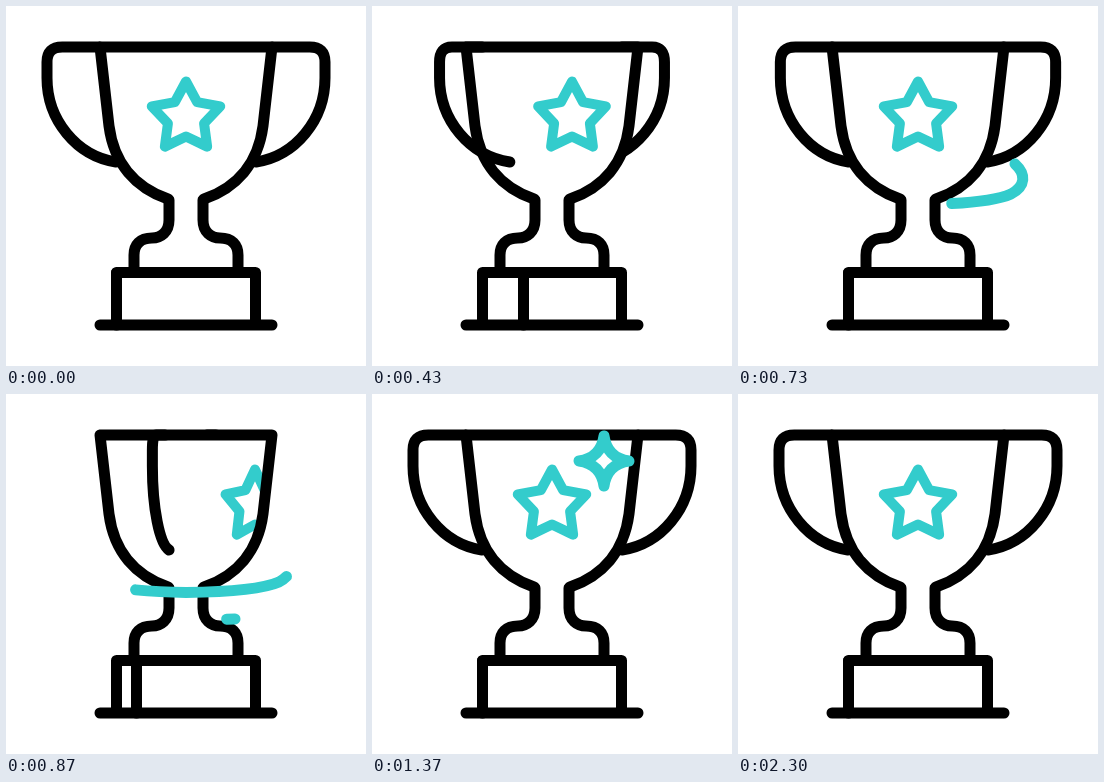
Write an HTML page that moves like this. It is 360 by 360 pixels and loops after 2.5 s.

```html
<!DOCTYPE html>
<html lang="en">
<head>
<meta charset="utf-8">
<title>Spinning trophy</title>
<style>
  html, body { margin: 0; height: 100%; overflow: hidden; background: #fff; }
  svg { display: block; width: 100vw; height: 100vh; }
  path { fill: none; stroke: #000; stroke-width: 11; stroke-linecap: round; stroke-linejoin: round; }
  .teal path, path.teal { stroke: #33cccc; }
</style>
</head>
<body>
<svg viewBox="0 0 360 360">
  <clipPath id="bowl"><path d="M94 41 L103 120 C108 158 130 182 162 193 H198 C230 182 252 158 257 120 L266 41 Z"/></clipPath>
  <path id="back"/>
  <rect width="360" height="360" fill="#fff" clip-path="url(#bowl)"/>
  <g clip-path="url(#bowl)"><path id="star" class="teal" style="stroke-width:10"/></g>
  <path d="M162 193 C130 182 108 158 103 120 L94 41 H266 L257 120 C252 158 230 182 198 193"/>
  <path d="M163 194 V214 C163 226 155 232 146 232 C134 232 128 239 128 249 V266"/>
  <path d="M197 194 V214 C197 226 205 232 214 232 C226 232 232 239 232 249 V266"/>
  <path d="M110.500 319 V266.500 H249.500 V319 M94 319 H266"/>
  <path id="edge" d="M110.500 267 V319"/>
  <path id="front"/>
  <g class="teal">
    <path id="upper" pathLength="1" d="M277 158 C288 168 288 180 273 188 C255 196 220 198 180 198.500 C140 198 100 194 85 187 C70 181 70 172 79 167"/>
    <path id="lower" pathLength="1" d="M229 225 C195 225.500 165 227 145 224 C125 220 120 212 128 206"/>
    <path id="spark" style="fill:#fff" d="M0 -25 Q3 -3 25 0 Q3 3 0 25 Q-3 3 -25 0 Q-3 -3 0 -25 Z"/>
  </g>
</svg>
<script>
const LOOP = 2500, FPS = 30, MID = 180, BASE = 139;
const STAR_LAP = 240;
const el = id => document.getElementById(id);
const set = (id, name, value) => el(id).setAttribute(name, value);

// Tracks are [frame, value] keys
const tracks = {
  turn: [[7, 0], [13, 36], [19, 138], [22, 172], [26, 256], [30, 360]],
  grip: [[7, 0], [13, 53], [19, 134], [22, 172], [26, 256], [30, 360]],
  star: [[7, 0], [13, 20], [19, 224], [22, 240], [26, 309], [30, 480]],
  edge: [[7, 0], [13, 41], [19, 130], [22, 139], [26, 159], [30, 278]],
  upperHead: [[17, 0], [19, .14], [26, .71], [30, 1]],
  upperTail: [[23, 0], [26, .11], [30, .55], [34, 1]],
  lowerHead: [[25, 0], [26, .07], [30, .44], [35, 1]],
  lowerTail: [[30, 0], [37, 1]],
  spark: [[34, 0], [41, 1], [62, 1], [69, 0]]
};

// Smooth interpolation that never overshoots its keys
function at(name, f) {
  const keys = tracks[name], last = keys.length - 1;
  if (f <= keys[0][0]) return keys[0][1];
  if (f >= keys[last][0]) return keys[last][1];
  const slope = i => (keys[i + 1][1] - keys[i][1]) / (keys[i + 1][0] - keys[i][0]);
  const tangent = i => {
    if (i === 0 || i === last) return 0;
    const a = slope(i - 1), b = slope(i);
    return a * b > 0 ? 2 * a * b / (a + b) : 0;
  };
  const i = keys.findIndex(k => k[0] > f) - 1;
  const [x, y] = keys[i], w = keys[i + 1][0] - x, u = (f - x) / w;
  const s = u * u * (3 - 2 * u);
  return y + (keys[i + 1][1] - y) * s
    + w * u * (1 - u) * ((1 - u) * tangent(i) - u * tangent(i + 1));
}

// outer and end are signed distances from the trophy's axis
function handle(outer, end) {
  const o = MID + outer, e = MID + end;
  return `M${MID + outer * .62} 41 H${MID + outer * .89} Q${o} 41 ${o} 56 V72
    C${o} 114 ${e + (o - e) * .57} 150 ${e} 156`;
}

function starPath(x, squeeze) {
  const points = Array.from({ length: 10 }, (_, i) => {
    const a = i * Math.PI / 5, r = i % 2 ? 19 : 36;
    return [MID + x + r * Math.sin(a) * squeeze, 111.5 - r * Math.cos(a)];
  });
  return `M${points.join('L')}Z`;
}

function ribbon(id, f) {
  const tail = at(id + 'Tail', f), length = at(id + 'Head', f) - tail;
  set(id, 'visibility', length > 0 ? 'visible' : 'hidden');
  set(id, 'stroke-dasharray', `${Math.max(length, 0)} 2`);
  set(id, 'stroke-dashoffset', -tail);
}

function draw(f) {
  const cos = name => Math.cos((at(name, f) % 180) * Math.PI / 180);
  const outer = 139 * cos('turn'), end = 70 * cos('grip');
  set('front', 'd', handle(-outer, -end));
  set('back', 'd', handle(outer, end));

  let x = at('star', f) % STAR_LAP;
  if (x > STAR_LAP / 2) x -= STAR_LAP;
  set('star', 'd', starPath(x, 1 - .14 * (x / 69) ** 2));
  set('edge', 'transform', `translate(${at('edge', f) % BASE})`);

  ribbon('upper', f);
  ribbon('lower', f);

  const scale = at('spark', f);
  set('spark', 'visibility', scale > 0 ? 'visible' : 'hidden');
  set('spark', 'transform', `translate(232 67) scale(${scale})`);
}

const start = performance.now();
function tick() {
  const t = (performance.now() - start) % LOOP;
  draw(Math.floor(t * FPS / 1000 + .2));
  requestAnimationFrame(tick);
}
tick();
</script>
</body>
</html>
```
